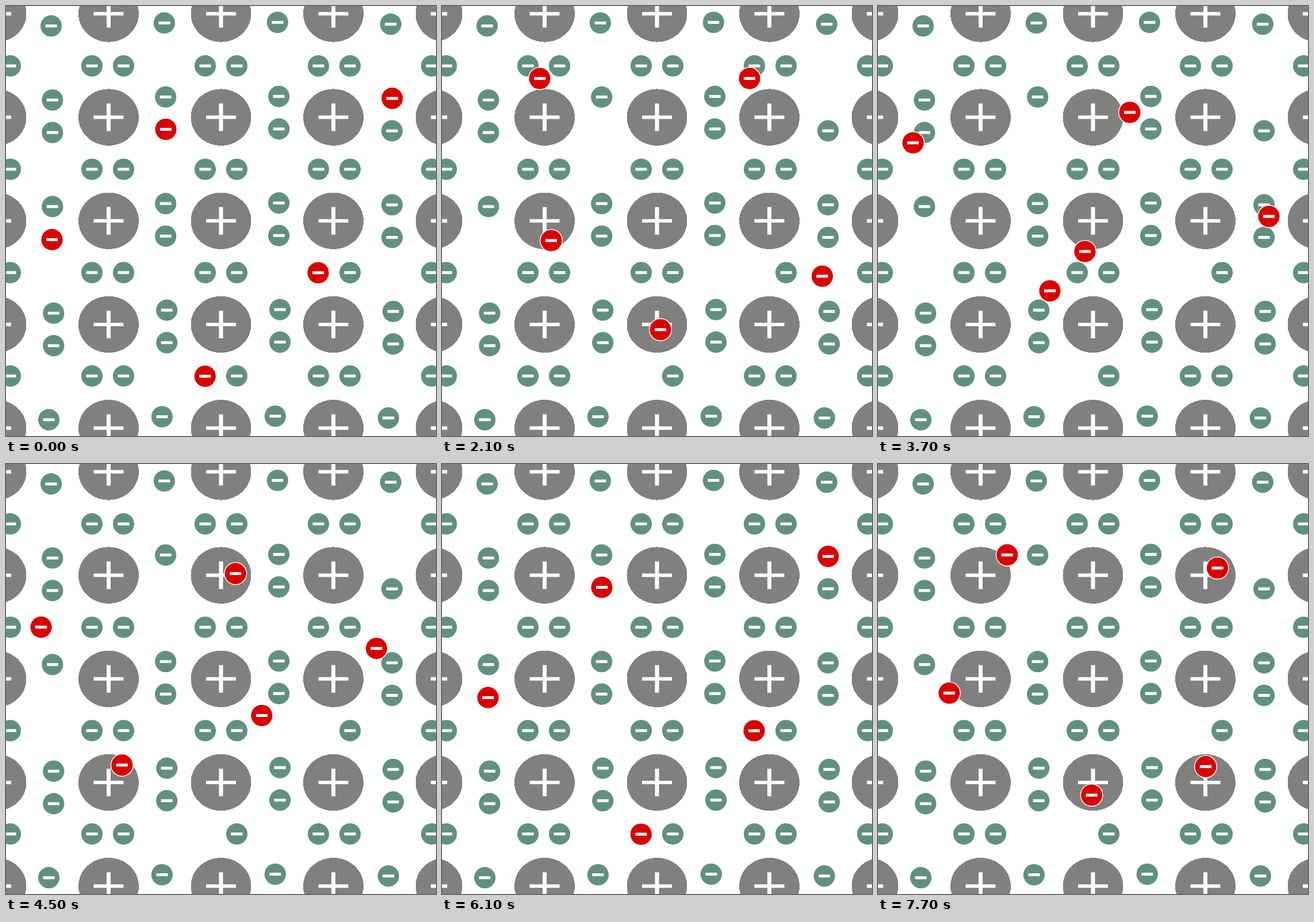
Recreate the animation shown at these times as an HTML page. Size 748 by 748 pixels, loop 8000 ms.

```html
<!DOCTYPE html>
<html lang="en">
<head>
<meta charset="utf-8">
<title>Electrons in a metal lattice</title>
<style>
  html, body { margin: 0; width: 100%; height: 100%; overflow: hidden; background: #fff; }
  svg { display: block; width: 100%; height: 100%; }
  .ion { fill: #80817e; shape-rendering: crispEdges; }
  .bound { fill: #619081; }
  .free { fill: #d90000; }
  .sign { fill: #fff; }
</style>
</head>
<body>
<svg id="stage" viewBox="0 0 748 748">
  <defs>
    <g id="ion">
      <ellipse class="ion" rx="52.5" ry="49.2"/>
      <path class="sign" d="M-26-3h52v6h-52zM-3.5-24h7v48h-7z"/>
    </g>
    <g id="bound">
      <circle class="bound" r="18.6"/>
      <rect class="sign" x="-10" y="-2.5" width="20" height="5"/>
    </g>
    <g id="free">
      <circle class="sign" r="20"/>
      <circle class="free" r="18.6"/>
      <rect class="sign" x="-10" y="-2.5" width="20" height="5"/>
    </g>
  </defs>
</svg>
<script>
const stage = document.getElementById('stage');
const STEPS = 16, STEP = 400, LOOP = 8000, LEAD = 100;

// Each electron drifts from its own gap to the gap of electron "next".
const keySteps = [0, 1, 3, 5, 7, 9, 11, 13, 15];
const electrons = [
  { next: 2, path: [[278, 214.5], [255.5, 207.2], [224.7, 158.2], [170, 126], [149.3, 190.5], [61, 238], [61, 283.8], [95, 346.9]] },
  { next: 0, path: [[671.8, 160.7], [650.2, 159.2], [590.5, 181], [535, 126], [481.3, 171.5], [438, 185], [399.2, 190.6], [324.7, 227.6]] },
  { next: 3, path: [[80, 406.4], [104.6, 386], [123.9, 398.5], [190, 408], [275.8, 416.3], [360, 427], [444.9, 437.5], [518.9, 442.7]] },
  { next: 1, path: [[543, 464], [556.6, 480.4], [570, 526.4], [661.5, 470], [731, 409.5], [680, 366], [644.5, 320.8], [701.7, 236.5]] },
  { next: 4, path: [[346.3, 644], [354.3, 618.4], [371.6, 576], [380, 563], [396.2, 487.2], [299, 495.5], [201.8, 523.8], [241.7, 594.8]] }
];

function place(el, x, y) {
  el.setAttribute('transform', `translate(${x} ${y})`);
}

function put(id, x, y) {
  const el = document.createElementNS('http://www.w3.org/2000/svg', 'use');
  el.setAttribute('href', '#' + id);
  place(el, x, y);
  stage.appendChild(el);
  return el;
}

function bound(x, y) {
  const isGap = electrons.some(({ path: [p] }) => Math.hypot(p[0] - x, p[1] - y) < 10);
  if (!isGap) put('bound', x, y);
}

function position({ path, next }, step) {
  const points = [...path, electrons[next].path[0]];
  const end = keySteps.findIndex(k => k >= step);
  if (end === 0) return points[0];
  const from = keySteps[end - 1];
  const f = (step - from) / (keySteps[end] - from);
  return points[end - 1].map((v, i) => v + (points[end][i] - v) * f);
}

for (let row = 0; row < 5; row++)
  for (let col = 0; col < 5; col++)
    put('ion', -17 + 195.5 * col, 13.4 + 180.2 * row);

// Horizontal pairs between the rows of ions
for (let row = 0; row < 4; row++)
  for (let col = 0; col < 5; col++)
    for (const dx of [-47.5, 7.5])
      bound(dx + 197 * col, 104.2 + 179.8 * row);

// Vertical pairs between the columns of ions, along a shallow arc
[78.5, 80.8, 80.8, 82.8, 74.5].forEach((x, row) => {
  for (let col = 0; col < 4; col++)
    for (const dy of [-28.3, 28.3])
      bound(x + 196.9 * col, 6.4 + 185.4 * row + dy + col * (2.1 * col - 7.3));
});

const movers = electrons.map(e => put('free', ...e.path[0]));

const start = performance.now();
function draw(now) {
  const t = Math.max(0, now - start) % LOOP;
  const step = Math.max(0, Math.floor((t - LEAD) / STEP)) % STEPS % 15;
  movers.forEach((el, i) => {
    const rest = t >= LEAD + 15 * STEP && t < LEAD + 16 * STEP;
    place(el, ...position(electrons[i], rest ? 15 : step));
  });
  requestAnimationFrame(draw);
}
requestAnimationFrame(draw);
</script>
</body>
</html>
```
